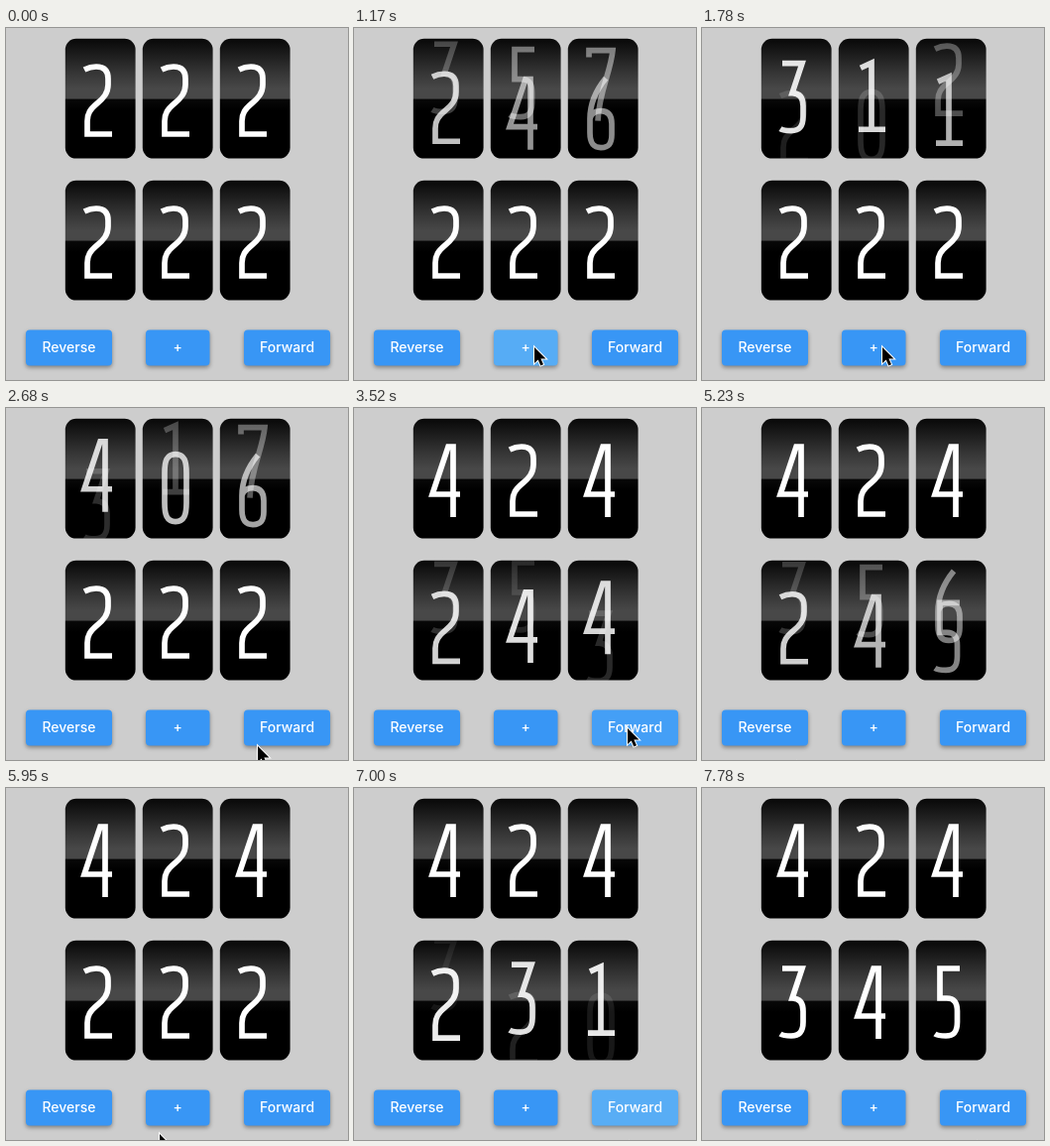
An HTML page with a canvas for the animation above (8330 ms loop, 345 by 355 pixels).

```html
<!DOCTYPE html>
<html lang="en">
<head>
<meta charset="utf-8">
<title>Odometer</title>
<style>
  html, body { margin: 0; width: 100%; height: 100%; overflow: hidden; background: #cdcdcd; }
  canvas { display: block; }
</style>
</head>
<body>
<canvas id="stage" width="345" height="355"></canvas>
<script>
const LOOP = 8330, STEP = 30;
const ctx = document.getElementById('stage').getContext('2d');

// Numerals as strokes in a 30 x 74 box
const glyphs = [
  'M15 3C6 3 4 10 4 22V52C4 64 6 71 15 71C24 71 26 64 26 52V22C26 10 24 3 15 3Z',
  'M4 9L15 4V71M2 71H29',
  'M1 6C5 4 9 3 13 3C21 3 25 7 25 15V21C25 30 20 35 14 40C7 46 4 50 4 58V71H29',
  'M3 3H23L13 33C21 33 24 38 24 46V57C24 67 20 71 12 71C8 71 4 71 1 69',
  'M22 74V3H17L1 51H29',
  'M26 3H6V33H13C21 33 23.5 38 23.5 46V57C23.5 67 20 71 12 71C8 71 4 71 1 69',
  'M20 1C11 12 4 26 4 42V56C4 67 8 71 15 71C23 71 26 67 26 58V47C26 38 22 34 15 34C9 34 5 37 4 42',
  'M3 10V3H27C25 25 13 45 12 74',
  'M15 35C8 35 5 30 5 22V15C5 7 8 3 15 3C22 3 25 7 25 15V22C25 30 22 35 15 35C7 35 4 40 4 48V57C4 67 8 71 15 71C22 71 26 67 26 57V48C26 40 23 35 15 35Z',
  'M10 73C19 62 26 48 26 32V18C26 7 22 3 15 3C7 3 4 7 4 16V27C4 36 8 40 15 40C21 40 25 37 26 32'
].map(d => new Path2D(d));

const clamp = v => Math.min(1, Math.max(0, v));
const mix = (a, b, u) => a + (b - a) * u;

const linear = u => u;
// cubic-bezier(.42, 0, 1, 1), solved by bisection
function easeIn(u) {
  let lo = 0, hi = 1;
  for (let i = 0; i < 24; i++) {
    const k = (lo + hi) / 2;
    const x = 1.26 * k * (1 - k) ** 2 + 3 * k * k * (1 - k) + k ** 3;
    if (x < u) lo = k; else hi = k;
  }
  return lo * lo * (3 - 2 * lo);
}
const easeInReversed = u => 1 - easeIn(1 - u);

// start, duration, from, to, easing
const rows = [
  { y: 11, moves: [
    [940, 950, 222, 323, linear],
    [1896, 950, 323, 424, linear]] },
  { y: 154, moves: [
    [3165, 990, 222, 345, easeIn],
    [4610, 990, 345, 222, easeInReversed],
    [6785, 990, 222, 345, easeIn]] }
];

const buttons = [
  { label: 'Reverse', x: 20, w: 87, presses: [4600] },
  { label: '+', x: 141, w: 64.5, presses: [940, 1890] },
  { label: 'Forward', x: 240, w: 87, presses: [3180, 6800] }
];

// time, x, y of the pointer tip
const pointer = [
  [550, 150, 357], [750, 182, 322], [2450, 182, 322], [2680, 254, 341],
  [3030, 276, 323], [3960, 276, 323], [4040, 282, 340], [4110, 200, 358],
  [4170, 88, 349], [4420, 66, 324], [4680, 66, 324], [4860, 66, 357],
  [5949, 155, 357], [5950, 155, 349], [6330, 155, 349], [6430, 43, 346],
  [6650, 278, 322], [6860, 278, 322], [6980, 278, 357]
];
const arrow = new Path2D('M0 0V16L3.7 12.6L6.3 18.5L9 17.3L6.4 11.6H11.5Z');

function box(x, y, w, h, r) {
  ctx.beginPath();
  ctx.roundRect(x, y, w, h, r);
}

function drawGlyph(n, x, y, alpha) {
  ctx.save();
  ctx.translate(x, y);
  ctx.globalAlpha = alpha;
  ctx.strokeStyle = '#fff';
  ctx.lineWidth = 5.7;
  ctx.stroke(glyphs[n % 10]);
  ctx.restore();
}

function drawTile(x, y, value) {
  ctx.save();
  box(x - 0.2, y - 0.2, 70.8, 120.8, 11);
  const gloss = ctx.createLinearGradient(0, y, 0, y + 120);
  gloss.addColorStop(0, '#080808');
  gloss.addColorStop(0.29, '#363636');
  gloss.addColorStop(0.42, '#484848');
  gloss.addColorStop(0.5, '#484848');
  gloss.addColorStop(0.51, '#080808');
  gloss.addColorStop(0.6, '#000');
  ctx.fillStyle = gloss;
  ctx.fill();
  ctx.clip();
  const n = Math.floor(value), p = value - n;
  drawGlyph(n, x + 18, y + 25 + STEP * p, 1 - p);
  if (p) drawGlyph(n + 1, x + 18, y + 25 + STEP * (p - 1), p);
  ctx.restore();
}

function drawRow({ y, moves }, t) {
  const [start, time, from, to, ease] = moves.findLast(m => m[0] <= t) || moves[0];
  const u = clamp((t - start) / time);
  const s = u < 1 ? ease(u) : 1;
  [100, 10, 1].forEach((unit, i) => {
    const value = mix(Math.floor(from / unit), Math.floor(to / unit), s);
    drawTile(60 + 78 * i, y, value);
  });
}

function glow(t, press) {
  const dt = t - press;
  return clamp(dt / 90) * clamp((420 - dt) / 200);
}

function drawButton({ label, x, w, presses }, t) {
  const lit = Math.max(...presses.map(p => glow(t, p)));
  ctx.save();
  ctx.shadowColor = 'rgba(0,0,0,.38)';
  ctx.shadowBlur = 4;
  ctx.shadowOffsetY = 2;
  ctx.fillStyle = '#3896f5';
  box(x, 304.5, w, 36, 4);
  ctx.fill();
  ctx.restore();
  ctx.fillStyle = `rgba(200,255,245,${0.22 * lit})`;
  ctx.fill();
  ctx.fillStyle = '#fff';
  ctx.font = '500 14px Inter, Roboto, sans-serif';
  ctx.textAlign = 'center';
  ctx.fillText(label, x + w / 2, 327);
}

function drawPointer(t) {
  const i = pointer.findLastIndex(k => k[0] <= t);
  if (i < 0) return;
  const a = pointer[i], b = pointer[i + 1] || a;
  const u = clamp((t - a[0]) / (b[0] - a[0] || 1));
  ctx.save();
  ctx.translate(mix(a[1], b[1], u), mix(a[2], b[2], u));
  ctx.strokeStyle = '#fff';
  ctx.lineWidth = 2;
  ctx.stroke(arrow);
  ctx.fillStyle = '#000';
  ctx.fill(arrow);
  ctx.restore();
}

function draw(now) {
  const t = now % LOOP;
  ctx.fillStyle = '#cdcdcd';
  ctx.fillRect(0, 0, 345, 355);
  rows.forEach(r => drawRow(r, t));
  buttons.forEach(b => drawButton(b, t));
  drawPointer(t);
}

let origin;
function tick(now) {
  origin ??= now;
  draw(now - origin);
  requestAnimationFrame(tick);
}
draw(0);
requestAnimationFrame(tick);
</script>
</body>
</html>
```
